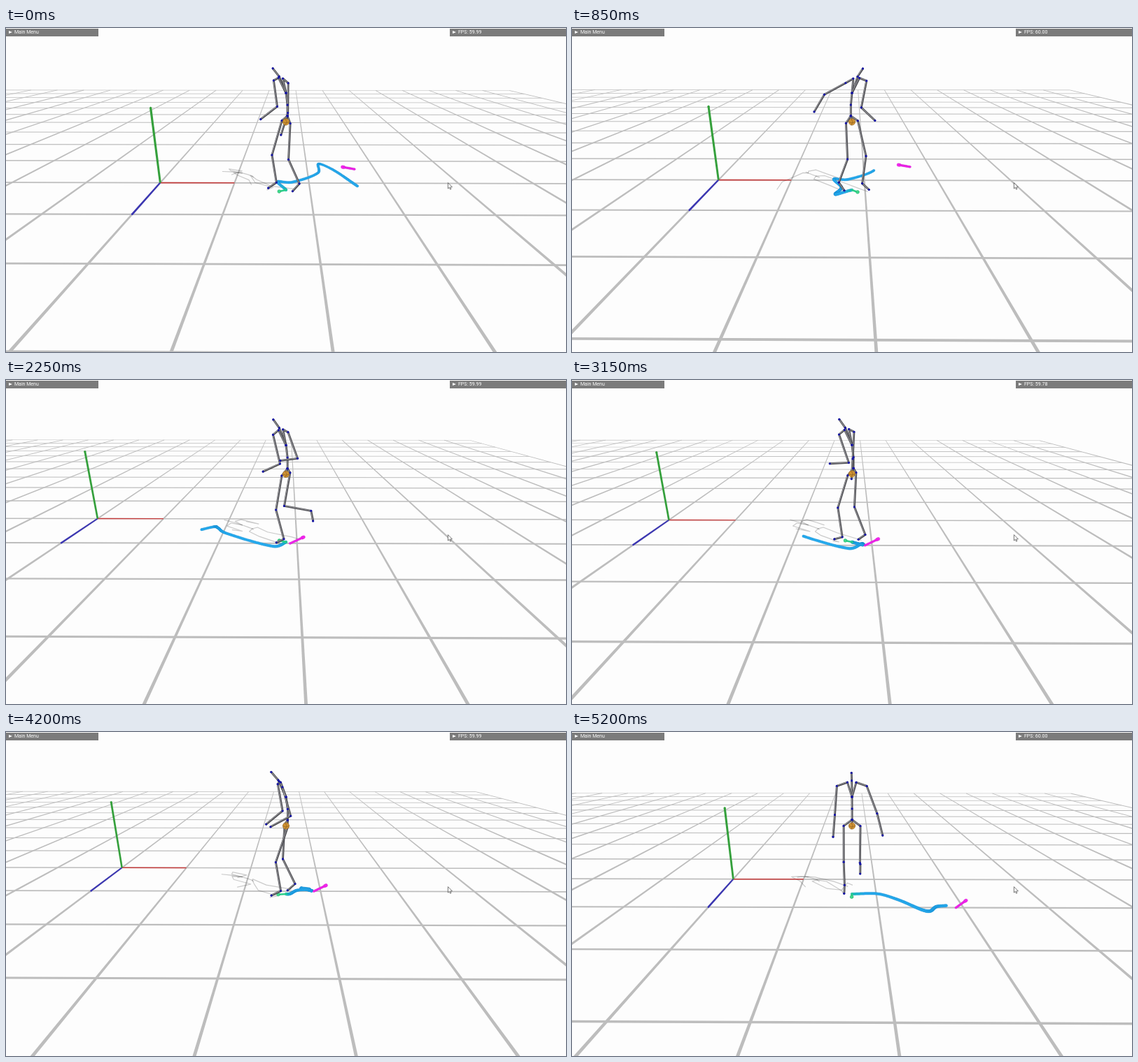
Recreate the animation shown at these times as an HTML page with a canvas. Size 800 by 464 pixels, loop 5.25 s.

```html
<!DOCTYPE html>
<html lang="en">
<head>
<meta charset="utf-8">
<title>Motion viewer</title>
<style>
  html, body { margin: 0; width: 100%; height: 100%; overflow: hidden; background: #fdfdfd; }
  canvas { position: absolute; left: 0; top: 0; }
  .bar {
    position: absolute; top: 1px; height: 10.5px; background: #7b7b7b; color: #fff;
    font: 7px/10.5px Roboto, sans-serif; white-space: pre; text-indent: 12px;
  }
  .bar::before {
    content: ""; position: absolute; left: 4px; top: 2.5px;
    border: solid transparent; border-width: 2.7px 0 2.7px 5px; border-left-color: #fff;
  }
</style>
</head>
<body>
<canvas id="stage" width="800" height="464"></canvas>
<div class="bar" style="left:0;width:132px">Main Menu</div>
<div class="bar" style="left:634px;width:166px" id="fps">FPS: 59.99</div>
<script>
const ctx = document.getElementById('stage').getContext('2d');
const fpsBar = document.getElementById('fps');
const LOOP = 5250, TRAIL = 1.6, GRID = 10, DEG = Math.PI / 180;

// Orbit camera looking at the ground point below the character
const CX = 400, CY = 232, F = 549, DIST = 4.92, YAW = 0.006;
const COS = 0.9303, SIN = 0.3667;
const LIGHT = { x: -0.52, z: -0.55 };

// Root path on the ground: seconds, x, z
const path = [
  [-1.6, 2.63, .11], [-1.2, 2.38, -.57], [-.98, 2.19, -.85], [-.75, 2.15, -.42],
  [-.4, 1.77, -.03], [-.22, 1.58, -.05], [0, 1.693, .257], [.55, 1.63, .515],
  [.85, 1.833, .366], [1.15, 1.9, .42], [1.5, 2.05, .635], [2, 2.7, 1.1],
  [2.25, 2.86, .953], [2.7, 2.88, .98], [3.15, 2.749, .886], [3.5, 2.86, .93],
  [3.75, 2.7, .965], [4.2, 2.55, 1.1], [4.65, 2.256, .755], [4.9, 2.02, .56],
  [5.2, 1.69, .569]
];

// Body signals at a few moments; angles in degrees, gait in cycles
const moments = [0, .85, 2.25, 3.15, 3.75, 4.65, 5.2];
const turn = [-60, 45, -120, -120, -120, -40, -2];
const gait = [.25, .75, 2, 2.75, 3.5, 4, 4.6];
const rightElbow = [70, 25, 100, 0, 100, 25, 25];
const leftElbow = [20, 75, 80, 105, 150, 10, 10];

const lerp = (a, b, k) => a + (b - a) * k;
const clamp = k => Math.min(1, Math.max(0, k));

function signal(values, t) {
  let i = 0;
  while (i < moments.length - 2 && moments[i + 1] <= t) i++;
  return lerp(values[i], values[i + 1], clamp((t - moments[i]) / (moments[i + 1] - moments[i])));
}

function rootAt(t) {
  const last = path.length - 1;
  let i = 0;
  while (i < last - 1 && path[i + 1][0] < t) i++;
  const a = path[i], b = path[i + 1];
  const before = path[Math.max(i - 1, 0)], after = path[Math.min(i + 2, last)];
  const h = b[0] - a[0], k = clamp((t - a[0]) / h), k2 = k * k, k3 = k2 * k;
  const hermite = n => {
    const va = (b[n] - before[n]) / (b[0] - before[0]) * h;
    const vb = (after[n] - a[n]) / (after[0] - a[0]) * h;
    return (2 * k3 - 3 * k2 + 1) * a[n] + (k3 - 2 * k2 + k) * va
      + (3 * k2 - 2 * k3) * b[n] + (k3 - k2) * vb;
  };
  return { x: hermite(1), z: hermite(2) };
}

// Point relative to the camera target, to screen; s is pixels per unit
function view(x, y, z) {
  const s = F / (DIST - z * COS - y * SIN);
  return { x: CX + x * s, y: CY - (y * COS - z * SIN) * s, s };
}

let root;
function project(x, y, z) {
  const dx = x - root.x, dz = z - root.z;
  return view(dx - YAW * dz, y, dx * YAW + dz);
}

// Next joint of a limb: swing is measured from straight down towards the front
function bone([side, up, front], length, swing, out = 0) {
  const a = swing * DEG, o = out * DEG;
  return [
    side + Math.sin(o) * length,
    up - Math.cos(o) * Math.cos(a) * length,
    front + Math.cos(o) * Math.sin(a) * length
  ];
}

function leg(side, phase) {
  const swing = 11 + 8 * Math.sin(phase);
  const shin = swing - 28 - 72 * Math.max(0, Math.cos(phase));
  const hip = [side * .1, 0, 0];
  const knee = bone(hip, .44, swing), ankle = bone(knee, .38, shin);
  return [hip, knee, ankle, bone(ankle, .13, shin + 75)];
}

function arm(side, bend, out) {
  const swing = 6 - .27 * bend;
  const shoulder = [side * .17, .47, .07];
  const elbow = bone(shoulder, .33, swing, side * out);
  return [[side * .05, .51, .07], shoulder, elbow, bone(elbow, .26, swing + bend, side * out * .7)];
}

// Chains of joints relative to the camera target, feet on the ground
function skeletonAt(t) {
  const phase = signal(gait, t) * 2 * Math.PI;
  const reach = 5 + 68 * Math.exp(-(((t - .85) / .5) ** 2));
  const spread = 22 * clamp((t - 3.9) / 1.2);
  const pelvis = [0, .07, -.02], chest = [0, .34, 0];
  const chains = [
    [pelvis, ...leg(1, phase)],
    [pelvis, ...leg(-1, phase + Math.PI)],
    [[0, 0, 0], pelvis, [0, .2, -.02], chest, [0, .53, .09], [0, .62, .17]],
    [chest, ...arm(1, signal(rightElbow, t), reach)],
    [chest, ...arm(-1, signal(leftElbow, t), spread)]
  ];
  const floor = Math.min(...chains.flat().map(p => p[1])) - .01;
  const a = signal(turn, t) * DEG, sin = Math.sin(a), cos = Math.cos(a);
  const place = ([side, up, front]) => [front * sin - side * cos, up - floor, front * cos + side * sin];
  return chains.map(c => c.map(place));
}

// Line that widens with perspective
function beam(a, b, size, color) {
  const len = Math.hypot(b.x - a.x, b.y - a.y) || 1;
  const nx = -(b.y - a.y) / len, ny = (b.x - a.x) / len;
  const wa = Math.max(size * a.s, .65) / 2, wb = Math.max(size * b.s, .65) / 2;
  ctx.fillStyle = color;
  ctx.beginPath();
  ctx.moveTo(a.x + nx * wa, a.y + ny * wa);
  ctx.lineTo(b.x + nx * wb, b.y + ny * wb);
  ctx.lineTo(b.x - nx * wb, b.y - ny * wb);
  ctx.lineTo(a.x - nx * wa, a.y - ny * wa);
  ctx.fill();
}

function stroke(points, width, color, dx = 0, dy = 0) {
  ctx.strokeStyle = color;
  ctx.lineWidth = width;
  ctx.beginPath();
  points.forEach(p => ctx.lineTo(p.x + dx, p.y + dy));
  ctx.stroke();
}

function dot(p, r, fill, edge) {
  ctx.beginPath();
  ctx.arc(p.x, p.y, r, 0, 7);
  ctx.fillStyle = fill;
  ctx.fill();
  if (edge) {
    ctx.strokeStyle = edge;
    ctx.lineWidth = .5;
    ctx.stroke();
  }
}

function drawGrid() {
  const near = Math.min(GRID, root.z + 4.6);
  for (let i = -GRID; i <= GRID; i++) {
    beam(project(i, 0, -GRID), project(i, 0, near), .021, '#bdbdbd');
    if (i < near) beam(project(-GRID, 0, i), project(GRID, 0, i), .017, '#bdbdbd');
  }
}

function drawAxes() {
  const o = project(0, 0, 0), top = project(0, 1, 0), end = project(0, 0, 1);
  beam(o, project(1, 0, 0), .015, '#c43a3a');
  beam(o, end, .021, '#3b36b4');
  beam(o, top, .028, '#35a03c');
  dot(top, 1.6, '#35a03c');
  dot(end, 1.3, '#3b36b4');
}

function drawTrail(t) {
  const count = TRAIL * 60;
  for (let i = 0; i <= count; i++) {
    const p = rootAt(t - TRAIL + i / 60), q = project(p.x, 0, p.z);
    const fresh = clamp((i - count + 8) / 8);
    const fill = `rgb(${lerp(40, 30, fresh)},${lerp(174, 200, fresh)},${lerp(240, 180, fresh)})`;
    dot(q, q.s * .018, fill, 'rgba(18,120,190,.4)');
  }
}

function drawMarkers(t) {
  const goal = t < 1.15 ? { x: 2.54, z: -.696, dx: .164, dz: .1 }
    : { x: 3.092, z: .776, dx: -.179, dz: .224 };
  for (let i = 10; i >= 0; i--) {
    const p = project(goal.x + goal.dx * i / 10, 0, goal.z + goal.dz * i / 10);
    dot(p, i < 2 ? 2.3 : 1.6, '#f425ee', 'rgba(190,20,190,.5)');
  }
  const a = signal(turn, t) * DEG;
  const tip = view(.1 * Math.sin(a), 0, .1 * Math.cos(a));
  stroke([view(0, 0, 0), tip], 2.6, '#2bcf8a');
  dot(tip, 2.4, '#3fd98c', '#1fa864');
}

function drawShadow(chains) {
  const cast = ([x, y, z]) => view(x + LIGHT.x * y, 0, z + LIGHT.z * y);
  ctx.filter = 'blur(.4px)';
  for (const c of chains) stroke(c.map(cast), 1.2, 'rgba(60,60,60,.26)');
  ctx.filter = 'none';
}

function drawBones(chains) {
  const drawn = chains.map(c => c.map(p => view(...p)));
  for (const c of drawn) {
    stroke(c, 2.9, '#4a4a4f');
    stroke(c, 1.1, '#98989c', -.4, -.4);
  }
  for (const p of drawn.flat()) dot(p, 1.6, '#1414a8');
  const ball = drawn[2][0];
  const fleck = (dx, dy) => ({ x: ball.x + dx, y: ball.y + dy });
  dot(ball, 4.7, '#cf9233', '#8f6220');
  stroke([fleck(-4.5, 0), fleck(0, 1.5), fleck(4.5, 0)], .7, '#8f6220');
  stroke([fleck(-1, -4.5), fleck(1, 0), fleck(-1, 4.5)], .7, '#8f6220');
}

function drawCursor() {
  const shape = new Path2D('M631.4 222v8l1.9-1.6 1.3 2.8 1.3-.6-1.3-2.6 2.4-.2z');
  ctx.fillStyle = '#fff';
  ctx.fill(shape);
  ctx.strokeStyle = '#555';
  ctx.lineWidth = .8;
  ctx.stroke(shape);
}

function fpsAt(t) {
  if ((t > .5 && t < 1.5) || t > 4.9) return '60.00';
  return t > 2.9 && t < 3.4 ? '59.78' : '59.99';
}

function render(t) {
  root = rootAt(t);
  ctx.fillStyle = '#fdfdfd';
  ctx.fillRect(0, 0, 800, 464);
  ctx.lineCap = ctx.lineJoin = 'round';
  const chains = skeletonAt(t);
  drawGrid();
  drawShadow(chains);
  drawAxes();
  drawTrail(t);
  drawMarkers(t);
  drawBones(chains);
  drawCursor();
  fpsBar.textContent = 'FPS: ' + fpsAt(t);
}

// 15 pictures a second on a 50 ms clock: holds of 50, 100, 50
let shown = -1;
const start = performance.now();
function tick() {
  let step = Math.floor((performance.now() - start) % LOOP / 50);
  if (step % 4 === 2) step--;
  if (step !== shown) render((shown = step) * .05);
  requestAnimationFrame(tick);
}
tick();
</script>
</body>
</html>
```
